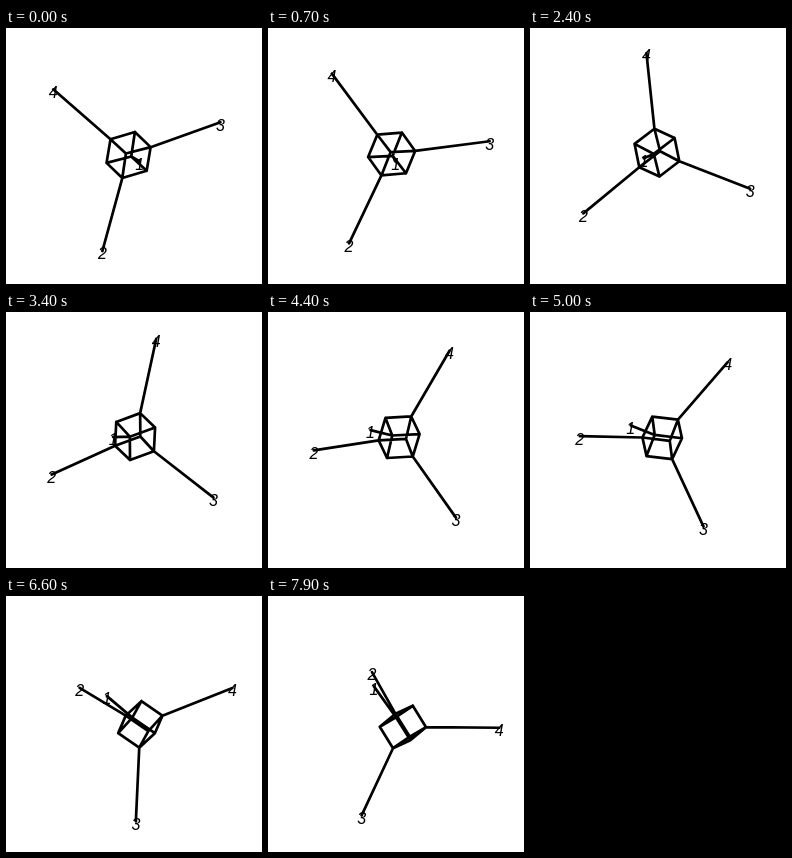
Recreate the animation shown at these times as an HTML page with a canvas. Size 256 by 256 pixels, loop 8 s.

```html
<!DOCTYPE html>
<html lang="en">
<head>
<meta charset="utf-8">
<title>Rotating cube with four axes</title>
<style>
  html, body { margin: 0; width: 100%; height: 100%; overflow: hidden; background: #fff; }
  canvas { display: block; width: 256px; height: 256px; }
</style>
</head>
<body>
<canvas id="stage" width="256" height="256"></canvas>
<script>
const ctx = document.getElementById('stage').getContext('2d');

const LOOP = 8000, STEP = 100;
const RAD = Math.PI / 180;
const SPEED = 17.8 * RAD;      // radians per second
const TILT = 18 * RAD;         // spin axis against the line of sight
const CAMERA = 590;
const CORNER = 0.24;           // cube corner as a share of its axis

// Body coordinates: x, y across the spin axis, h along it
const centre = [-5.4, -4.3, -10];
const axes = [
  [12, 35.5, 86],
  [-24, 72.5, -66],
  [86.5, -40, -24],
  [-73.5, -64.8, 8]
];

function project([x, y, h], angle) {
  const c = Math.cos(angle), s = Math.sin(angle);
  const px = x * c - y * s;
  const py = x * s + y * c;
  const depth = py * Math.sin(TILT) + h * Math.cos(TILT);
  const scale = CAMERA / (CAMERA + 9.5 + depth);
  return [
    128 + px * scale,
    128 + (py * Math.cos(TILT) - h * Math.sin(TILT)) * scale
  ];
}

const mix = (a, b, k) => a.map((v, i) => v + (b[i] - v) * k);

function line(a, b) {
  ctx.moveTo(...a);
  ctx.lineTo(...b);
}

function draw(seconds) {
  const angle = SPEED * seconds;
  const hub = project(centre, angle);
  const tips = axes.map(axis => project(axis.map((v, i) => v + centre[i]), angle));
  const near = tips.map(tip => mix(hub, tip, CORNER));
  const far = tips.map(tip => mix(hub, tip, -CORNER));

  ctx.fillStyle = '#fff';
  ctx.fillRect(0, 0, 256, 256);

  ctx.beginPath();
  near.forEach((p, i) => {
    line(p, tips[i]);
    far.forEach((q, j) => { if (i !== j) line(p, q); });
  });
  ctx.strokeStyle = '#000';
  ctx.lineWidth = 2.7;
  ctx.lineCap = 'round';
  ctx.stroke();

  ctx.fillStyle = '#000';
  ctx.font = 'italic 16px "Liberation Sans", Arial, sans-serif';
  ctx.textAlign = 'center';
  ctx.textBaseline = 'alphabetic';
  tips.forEach(([x, y], i) => ctx.fillText(i + 1, x, y + 8.3));
}

function tick() {
  const time = performance.now() % LOOP;
  draw(Math.floor(time / STEP) * STEP / 1000);
  requestAnimationFrame(tick);
}
tick();
</script>
</body>
</html>
```
